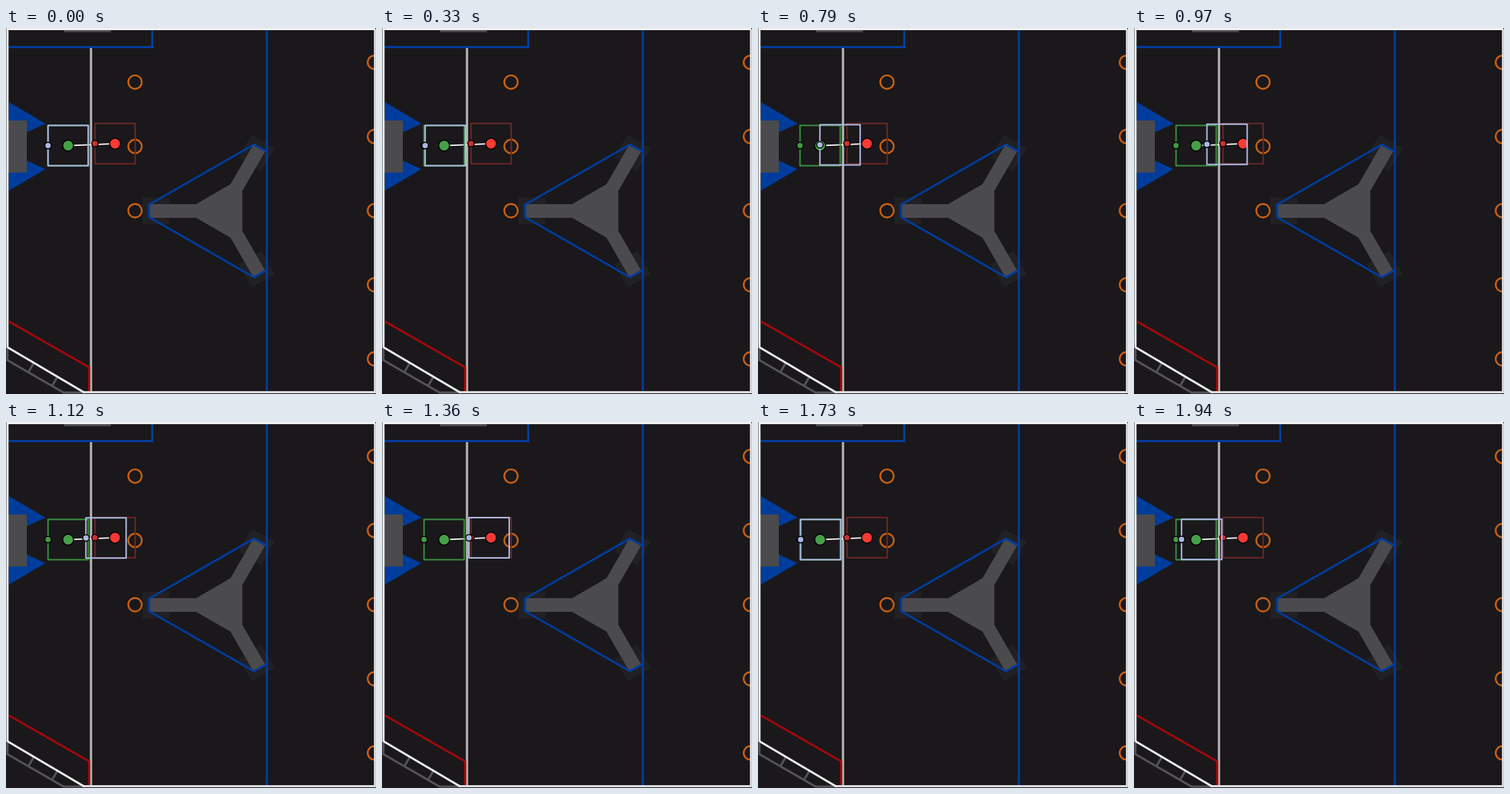
Recreate the animation shown at these times as an HTML page with a canvas. Size 515 by 509 pixels, loop 1970 ms.

```html
<!DOCTYPE html>
<html lang="en">
<head>
<meta charset="utf-8">
<title>Path preview</title>
<style>
html, body { margin: 0; width: 100%; height: 100%; overflow: hidden; background: #1a181b; }
canvas { display: block; }
</style>
</head>
<body>
<canvas id="stage" width="515" height="509"></canvas>
<script>
const ctx = document.getElementById('stage').getContext('2d');
const BG = '#1a181b', BLUE = '#003c9b', GRAY = '#4b4a4c', RAIL = '#555456';
const LOOP = 1970;
const RUN = 1387, FIRST = 185, SECOND = 1621; // ms: length and starts of the runs
const PEAK = 0.45; // share of the run spent speeding up
const START = { x: 86.5, y: 163.6 }, END = { x: 151.8, y: 160.8 };
const HALF = 28;

function trace(points, close) {
  ctx.beginPath();
  points.forEach(([x, y]) => ctx.lineTo(x, y));
  if (close) ctx.closePath();
}

function line(points, color, width) {
  trace(points);
  ctx.strokeStyle = color;
  ctx.lineWidth = width;
  ctx.stroke();
}

function shape(points, color) {
  trace(points, true);
  ctx.fillStyle = color;
  ctx.fill();
}

function circle(x, y, r, stroke, width, fill) {
  ctx.beginPath();
  ctx.arc(x, y, r, 0, Math.PI * 2);
  if (fill) {
    ctx.fillStyle = fill;
    ctx.fill();
  }
  ctx.strokeStyle = stroke;
  ctx.lineWidth = width;
  ctx.stroke();
}

const ring = (x, y) => circle(x, y, 9.4, '#cc620f', 2.4);
const dot = (x, y, r, color) => circle(x, y, r, '#000', 1.5, color);
const flip = (points, axis) => points.map(([x, y]) => [x, 2 * axis - y]);

function robot(p, color, dotColor) {
  ctx.strokeStyle = color;
  ctx.lineWidth = 2;
  ctx.lineJoin = 'round';
  ctx.strokeRect(p.x - HALF, p.y - HALF, HALF * 2, HALF * 2);
  ctx.lineJoin = 'miter';
  dot(p.x - HALF, p.y, 4.5, dotColor);
}

function tripod(x, y) {
  const pad = [[-112, -18.5], [-75, -18.5], [-75, 18.5], [-112, 18.5]];
  const arm = [[-102, -9.5], [-37, -9.5], [10.3, -36.8]];
  const leg = [...arm, ...flip(arm, 0).reverse()];
  ctx.save();
  ctx.translate(x, y);
  for (const [points, color] of [[pad, '#212023'], [leg, GRAY]]) {
    for (let i = 0; i < 3; i++) {
      shape(points, color);
      ctx.rotate(Math.PI * 2 / 3);
    }
  }
  const edge = [[60, -82.9], [43, -92.1], [-103, -8.6]];
  line([...edge, ...flip(edge, 0).reverse()], BLUE, 3);
  ctx.restore();
}

function field() {
  ctx.fillStyle = BG;
  ctx.fillRect(0, 0, 515, 509);

  ctx.fillStyle = GRAY;
  ctx.fillRect(81, 2, 65, 4);
  line([[3, 26.5], [203.5, 26.5], [203.5, 2]], BLUE, 3);

  const wing = [[4, 103], [55, 133], [29, 145], [4, 145]];
  shape(wing, BLUE);
  shape(flip(wing, 164.6), BLUE);
  ctx.fillStyle = GRAY;
  ctx.fillRect(3, 128.5, 26, 72.5);

  tripod(302, 254.4);
  line([[363, 2], [363, 505]], BLUE, 3);
  line([[118.3, 28], [118.3, 505]], '#b4b3b4', 3.2);
  line([[4, 408], [115.8, 472], [115.8, 505]], '#a3080c', 3);

  line([[2, 446], [2, 462], [80, 507], [108, 507]], RAIL, 3);
  for (const x of [38, 71]) {
    const y = 467 + (x - 38) * 0.577;
    line([[x, y], [x - 7, y + 12]], RAIL, 3);
  }

  for (let i = 0; i < 3; i++) ring(179.6, 75.3 + i * 89.4);
  for (let i = 0; i < 5; i++) ring(512.8, 47.8 + i * 103.1);

  line([[108, 506.5], [513.5, 506.5], [513.5, 1.5]], '#dedede', 2.8);
  line([[514, 1.5], [2, 1.5], [2, 444], [109, 507]], '#f0f0f0', 3);
}

// Constant acceleration up to PEAK, then constant braking
function progress(t) {
  const elapsed = t - (t < SECOND ? FIRST : SECOND);
  const u = Math.min(1, Math.max(0, elapsed / RUN));
  return u < PEAK ? u * u / PEAK : 1 - (1 - u) ** 2 / (1 - PEAK);
}

function draw(t) {
  const k = progress(t);
  field();
  line([[START.x, START.y], [END.x, END.y]], '#fff', 1.8);
  robot(END, '#6c2825', '#c9332d');
  robot(START, '#3c8f40', '#429a45');
  dot(START.x, START.y, 7.6, '#46a048');
  dot(END.x, END.y, 7.6, '#fa3a34');
  robot({
    x: START.x + (END.x - START.x) * k,
    y: START.y + (END.y - START.y) * k
  }, '#b0bce8', '#aab7e2');
}

function frame() {
  draw(performance.now() % LOOP);
  requestAnimationFrame(frame);
}
frame();
</script>
</body>
</html>
```
